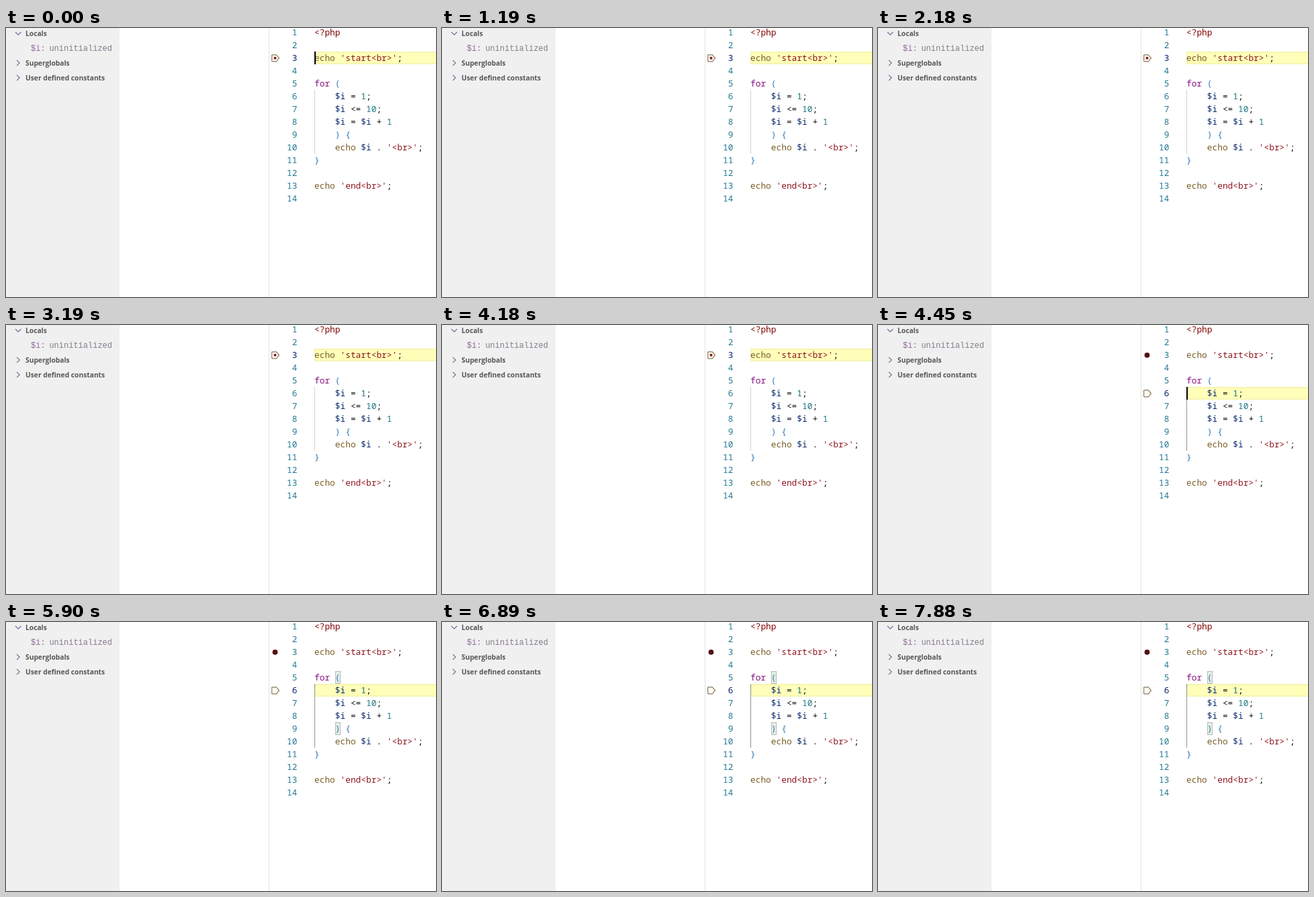
An HTML page that plays this animation: 640x400 px, repeating every 8 s.

```html
<!DOCTYPE html>
<html lang="en">
<head>
<meta charset="utf-8">
<title>Debugger stepping</title>
<style>
  html, body { margin: 0; width: 100%; height: 100%; overflow: hidden; background: #fff; }
  svg { display: block; width: 640px; height: 400px; }
  text { white-space: pre; }
  .code { font: 12.83px "Noto Sans Mono", monospace; }
  .vars { font: 12px "Liberation Mono", monospace; }
  .head { font: bold 10.25px "Open Sans", sans-serif; fill: #575757; }
  .chevron { fill: none; stroke: #5c6f93; stroke-width: 1.1; }
</style>
</head>
<body>
<svg id="stage" viewBox="0 0 640 400" xmlns="http://www.w3.org/2000/svg"></svg>
<script>
const LOOP = 8000, STEP_START = 4380, STEP_END = 4450, BRACKETS = 4520;
const LINE_H = 19, CHAR_W = 7.7, CODE_X = 459;
const BLINKS = [200, 730, 1190, 1720, 2180, 2710, 3190, 3720, 4180,
                4450, 4910, 5440, 5900, 6430, 6890, 7420, 7880];

const SOURCE = `<?php

echo 'start<br>';

for (
    $i = 1;
    $i <= 10;
    $i = $i + 1
    ) {
    echo $i . '<br>';
}

echo 'end<br>';
`.split('\n');

const TOKENS = [
  [/^<\?php/, '#800000'],
  [/^'[^']*'/, '#8f1620'],
  [/^echo/, '#795e26'],
  [/^for/, '#85107f'],
  [/^\$\w+/, '#0b2a70'],
  [/^\d+/, '#1f7582'],
  [/^[(){}]/, '#2f78b8'],
  [/^[^\s\w]+/, '#111']
];

const stage = document.getElementById('stage');
const lineTop = n => n * LINE_H - 22;

function add(tag, attrs, content) {
  const el = document.createElementNS(stage.namespaceURI, tag);
  for (const key in attrs) el.setAttribute(key, attrs[key]);
  if (content !== undefined) el.textContent = content;
  return stage.appendChild(el);
}

const rect = (x, y, width, height, fill, extra) =>
  add('rect', { x, y, width, height, fill, ...extra });
const label = (cls, x, y, content, extra) =>
  add('text', { class: cls, x, y, ...extra }, content);
const show = (el, on) => el.setAttribute('visibility', on ? 'visible' : 'hidden');

// Side panel
rect(0, 0, 169, 400, '#f0f0f0');
rect(391, 0, 1, 400, '#e3e3e3');
add('path', { class: 'chevron', d: 'M14 6l4.2 4.2L22.4 6' });
for (const y of [52, 74])
  add('path', { class: 'chevron', d: `M16 ${y - 4.2}l4.2 4.2l-4.2 4.2` });
label('head', 29, 12, 'Locals');
label('head', 29, 56, 'Superglobals');
label('head', 29, 78, 'User defined constants');
label('vars', 37, 34, '$i:', { fill: '#8d6a9a' });
label('vars', 64.4, 34, 'uninitialized', { fill: '#857a8a' });

// Line decorations
const currentLine = rect(CODE_X + 1, 0, 190, LINE_H - 2, 'none',
  { stroke: '#eee', 'stroke-width': 2 });
const pausedLine = rect(CODE_X, 0, 181, LINE_H, '#ffff66', { 'fill-opacity': 0.45 });
const guide = rect(CODE_X, lineTop(6), 1, LINE_H * 5, '#d3d3d3');
const matches = [5, 9].map(n =>
  rect(490.5, lineTop(n) + 0.5, 7, LINE_H - 1, '#e5f0e5', { stroke: '#b9b9b9' }));

// Gutter and code
const numbers = SOURCE.map((line, i) => {
  const y = lineTop(i + 1) + 14;
  let col = 0;
  while (col < line.length) {
    const rest = line.slice(col);
    const token = TOKENS.find(([pattern]) => pattern.test(rest));
    if (!token) { col++; continue; }
    const word = rest.match(token[0])[0];
    label('code', CODE_X + col * CHAR_W, y, word, { fill: token[1] });
    col += word.length;
  }
  return label('code', 433.4, y, i + 1, { 'text-anchor': 'end' });
});

const arrow = add('path', {
  d: 'M396.5 39.8h5.8l4.2 5l-4.2 5h-5.8q-.8 0-.8-.8v-8.4q0-.8.8-.8z',
  fill: '#fffdf2', stroke: '#8b7a62', 'stroke-width': 1.2
});
const breakpoint = add('circle', { cx: 400.5, cy: 44.8 });
const caret = rect(CODE_X, 0, 2, LINE_H, '#000');

function render(t) {
  const line = t < STEP_END ? 3 : 6;
  const top = lineTop(line);
  const running = t >= STEP_START && t < STEP_END;
  const atBreakpoint = t < STEP_START;

  currentLine.setAttribute('y', top + 1);
  pausedLine.setAttribute('y', top);
  show(pausedLine, !running);
  show(arrow, !running);
  arrow.setAttribute('transform', `translate(0 ${top - lineTop(3)})`);
  breakpoint.setAttribute('r', atBreakpoint ? 2 : 3.9);
  breakpoint.setAttribute('fill', atBreakpoint ? '#8c1616' : '#571010');

  guide.setAttribute('fill', line === 6 ? '#939393' : '#d3d3d3');
  matches.forEach(box => show(box, t >= BRACKETS));
  numbers.forEach((el, i) =>
    el.setAttribute('fill', i + 1 === line ? '#0b216f' : '#237893'));

  caret.setAttribute('y', top);
  show(caret, BLINKS.filter(time => time <= t).length % 2 === 0);
}

const start = performance.now();
function tick(now) {
  render(Math.max(0, now - start) % LOOP);
  requestAnimationFrame(tick);
}
render(0);
requestAnimationFrame(tick);
</script>
</body>
</html>
```
